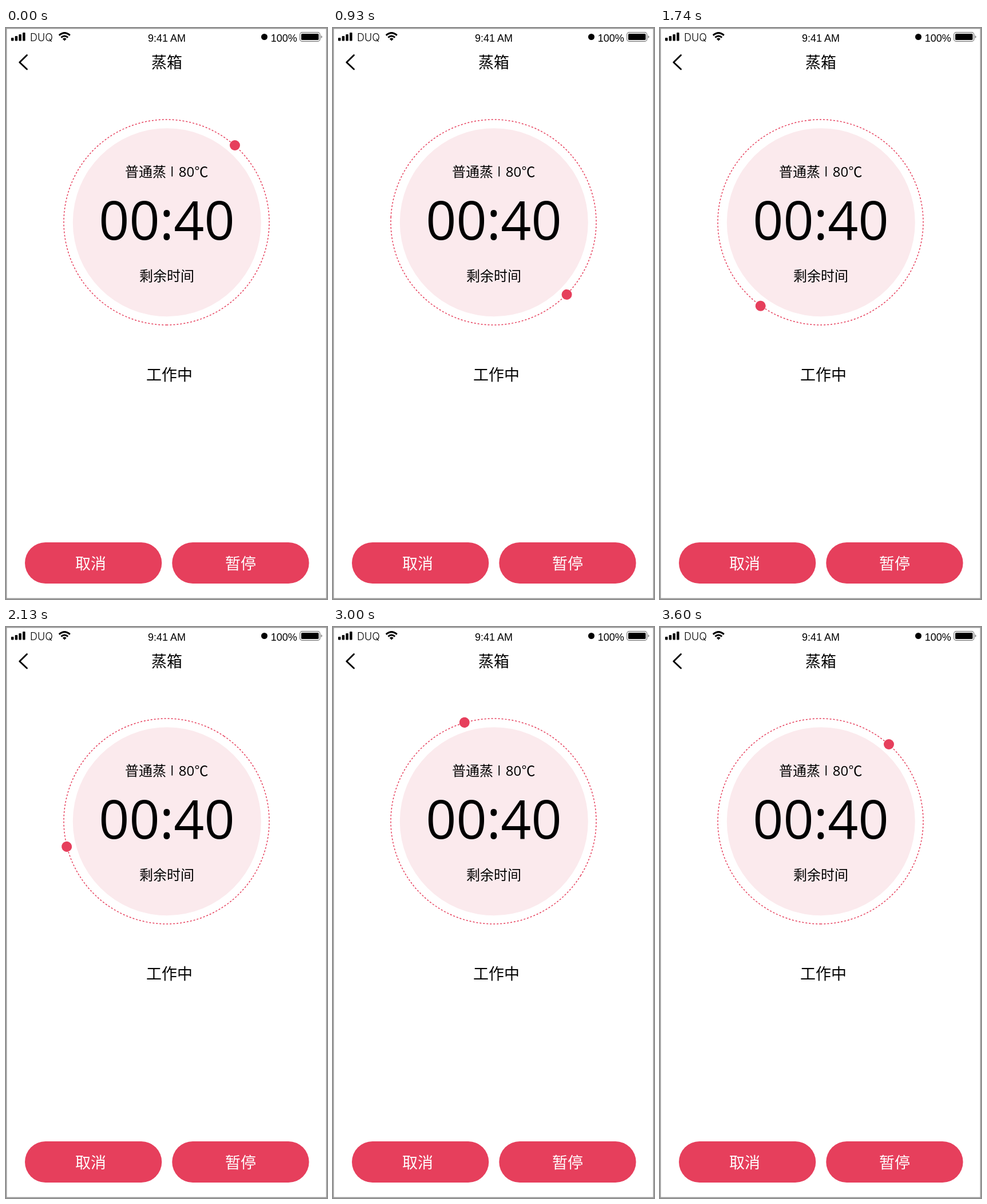
Write an HTML page that moves like this. It is 561 px wide and 998 px high and loops after 3.7 s.

```html
<!DOCTYPE html>
<html lang="zh-CN">
<head>
<meta charset="utf-8">
<title>蒸箱</title>
<style>
  html, body { margin: 0; width: 100%; height: 100%; overflow: hidden; background: #fff; }
  svg { display: block; }
  text { font: 350 27px "Noto Sans CJK SC", "Noto Sans CJK", sans-serif; text-anchor: middle; }
  .status text { font: 18px "Liberation Sans", sans-serif; }
  .status .carrier { font: 300 18px Inter, sans-serif; }
  .label { font-size: 24px; }
  .digits { font-family: "Open Sans", sans-serif; font-weight: 400; }
  .time { font-size: 93px; }
  .accent { fill: #e63f5c; }
  .line { fill: none; stroke: #000; }
  .button text { fill: #fff; }
</style>
</head>
<body>
<svg width="561" height="998" viewBox="0 0 561 998">
  <rect x=".75" y=".75" width="559.5" height="996.5" fill="#fff" stroke="#979797" stroke-width="1.5"/>

  <g class="status">
    <rect x="9" y="17" width="4.5" height="5.5" rx="1"/>
    <rect x="15.7" y="14" width="4.5" height="8.5" rx="1"/>
    <rect x="22.4" y="11" width="4.5" height="11.5" rx="1"/>
    <rect x="29.1" y="8" width="4.5" height="14.5" rx="1"/>
    <text class="carrier" x="62" y="22.5">DUQ</text>
    <path class="line" stroke-width="3" d="M92.8 12.8Q102.3 4.4 111.8 12.8M96.4 16.7Q102.3 11.4 108.2 16.7"/>
    <path d="M102.3 22.4L98.9 18.9Q102.3 16.2 105.7 18.9Z"/>
    <text x="281" y="23.7">9:41 AM</text>
    <circle cx="451.5" cy="15.5" r="5.5"/>
    <text x="485.8" y="23.7">100%</text>
    <rect class="line" x="513.7" y="7.7" width="35" height="15.6" rx="3.8" stroke-width="1.2" opacity=".55"/>
    <rect x="516" y="10" width="30.5" height="11" rx="1.5"/>
    <path d="M550.5 13Q552.6 13.6 552.6 15.5Q552.6 17.4 550.5 18Z" opacity=".5"/>
  </g>

  <path class="line" stroke-width="2.9" stroke-linecap="round" stroke-linejoin="round" d="M36.5 47.5L23.8 60L36.5 72"/>
  <text x="281" y="69.5">蒸箱</text>

  <circle cx="281.3" cy="339.7" r="164.5" fill="#fbeaed"/>
  <g id="dial">
    <path fill="none" stroke="#e63f5c" stroke-width="1.5" stroke-dasharray="2.992"
      d="M280.5 519A179.5 179.5 0 0 0 280.5 160A179.5 179.5 0 0 0 280.5 519"/>
    <circle class="accent" cx="400" cy="205" r="9"/>
  </g>

  <text class="label" x="244" y="260">普通蒸</text>
  <rect x="289.4" y="242" width="1.8" height="17.5"/>
  <text class="label digits" x="315.5" y="259.5">80</text>
  <text class="label" x="341.5" y="259.5">℃</text>
  <text class="digits time" x="281" y="370">00:40</text>
  <text class="label" x="281" y="442">剩余时间</text>
  <text x="285.5" y="615.5">工作中</text>

  <g class="button">
    <rect class="accent" x="33" y="899" width="239.3" height="72" rx="36"/>
    <text x="148" y="946">取消</text>
    <rect class="accent" x="290.3" y="899" width="239.3" height="72" rx="36"/>
    <text x="410" y="946">暂停</text>
  </g>
</svg>
<script>
  const LOOP = 3700, STEP = 30, LEG = 900;
  const stops = [0, 90, 180, 273, 360];
  const dial = document.getElementById('dial');

  function angleAt(ms) {
    const t = Math.min(Math.floor(ms / STEP) * STEP, 3600);
    const leg = Math.min(Math.floor(t / LEG), 3);
    return stops[leg] + (stops[leg + 1] - stops[leg]) * (t / LEG - leg);
  }

  function draw() {
    dial.setAttribute('transform', `rotate(${angleAt(performance.now() % LOOP)} 280.5 339.5)`);
    requestAnimationFrame(draw);
  }
  draw();
</script>
</body>
</html>
```
